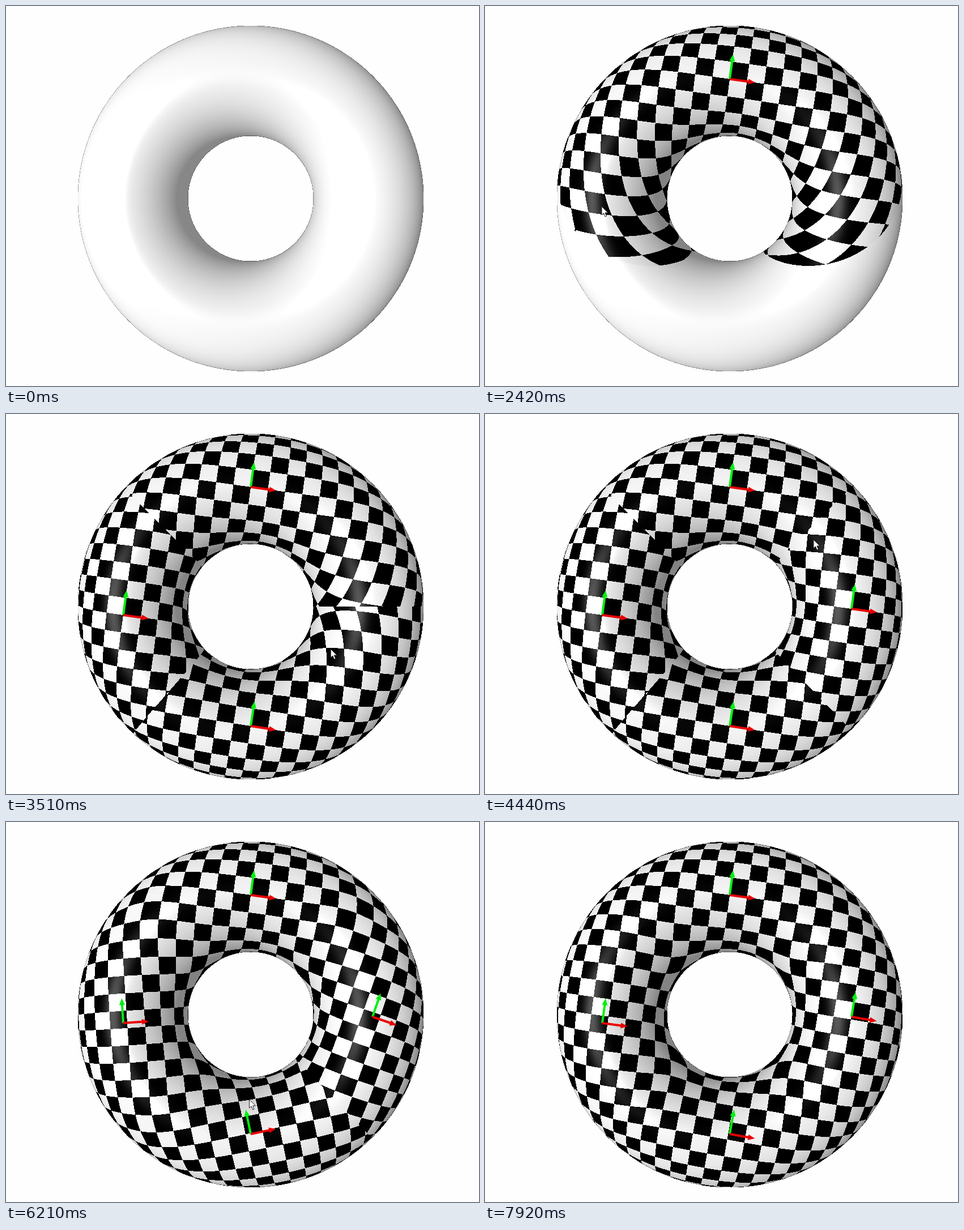
Recreate the animation shown at these times as an HTML page with a canvas. Size 835 px wide and 671 px high, loop 7.99 s.

```html
<!DOCTYPE html>
<html lang="en">
<head>
<meta charset="utf-8">
<title>Checker decals on a torus</title>
<style>
  html, body { margin: 0; width: 100%; height: 100%; overflow: hidden; background: #fefefe; }
  canvas { display: block; }
</style>
</head>
<body>
<canvas id="stage" width="835" height="671"></canvas>
<script>
const W = 835, H = 671, CX = 432, CY = 340, LOOP = 7990;
const EYE = 900, R = 205.7, r = 94.5;          // camera distance, torus radii
const CELL = 27.5, REACH = 352, BLEND = 30;    // checker size, decal radius, seam softness
const TAU = 2 * Math.PI;

// Decal centres on screen: top, left, bottom, right.
const seeds = [[432, 129], [207, 355], [432, 551], [647, 344]].map(([x, y]) => ({ x, y, ...locate(x, y) }));
const LINKS = [[0, 3], [0, 1], [1, 2], [2, 3]];

// Start time, frame angle of each placed decal, number of blended links.
const STATES = [
  [0, [], 0],
  [1500, [7.8], 0],
  [2650, [7.8, 7.8], 0],
  [3200, [7.8, 7.8, 8.8], 0],
  [3950, [7.8, 7.8, 8.8, 7.8], 0],
  [4600, [7.8, 7.8, 8.8, 19], 1],
  [5480, [7.8, -3.7, 8.8, 19], 2],
  [5920, [7.8, -3.7, -11.6, 19], 3],
  [6750, [7.8, 7.8, 10, 9.5], 4]
];
const POINTER = [
  [70, 763, 671], [810, 431, 129], [1650, 431, 129], [2400, 206, 354], [2660, 206, 354],
  [3040, 432, 551], [3220, 432, 551], [3700, 647, 344], [3960, 647, 344], [4400, 580, 222],
  [4620, 580, 222], [5280, 290, 217], [5490, 290, 217], [5780, 290, 490], [5930, 290, 490],
  [6500, 575, 490], [7000, 575, 490]
];
const CLICKS = [[1250, 1500], [2480, 2650], [3070, 3200], [3800, 3950], [4450, 4600],
  [5350, 5480], [5800, 5920], [6600, 6750]];

// Screen point to torus angles; null where the ray misses.
function locate(x, y) {
  const dx = x - CX, dy = y - CY, d = Math.hypot(dx, dy);
  const a = d * d + EYE * EYE, b = R * d + EYE * EYE, c = R * R + EYE * EYE - r * r;
  const disc = b * b - a * c;
  if (disc < 0) return null;
  const k = (b - Math.sqrt(disc)) / a, rho = d * k, z = EYE * (1 - k);
  let phi = Math.atan2(z, rho - R);
  if (phi < -1) phi += TAU;
  return { theta: Math.atan2(dy, dx), phi, rho, z };
}

// Exponential map of one seed, stored on a (theta, phi) grid.
const NT = 630, NP = 120, PHI0 = 0.2, PHI1 = 3.4;
const gridX = theta => (theta + Math.PI) / TAU * (NT - 1);
const gridY = phi => (phi - PHI0) / (PHI1 - PHI0) * (NP - 1);

function geodesic(seed, alpha) {
  const h = 2, pts = [];
  let phi = seed.phi, speed = Math.sin(alpha) / r, theta = 0;
  const c = (R + r * Math.cos(phi)) * Math.cos(alpha);
  const dirX = -Math.sin(seed.theta + alpha), dirY = Math.cos(seed.theta + alpha);
  const accel = p => -Math.sin(p) * c * c / (r * (R + r * Math.cos(p)) ** 3);
  for (let i = 0; i <= 240; i++) {
    if (i % 4 === 0) pts.push([gridX(theta), gridY(phi), dirX * i * h, dirY * i * h]);
    speed += accel(phi) * h / 2;
    const next = phi + speed * h;
    theta += h * c / (R + r * Math.cos((phi + next) / 2)) ** 2;
    phi = next;
    speed += accel(phi) * h / 2;
  }
  return pts;
}

function fillTriangle(map, a, b, c) {
  const bx = b[0] - a[0], by = b[1] - a[1], cx = c[0] - a[0], cy = c[1] - a[1];
  const det = bx * cy - cx * by;
  if (!det) return;
  const x0 = Math.max(0, Math.ceil(Math.min(a[0], b[0], c[0])));
  const x1 = Math.min(NT - 1, Math.floor(Math.max(a[0], b[0], c[0])));
  const y0 = Math.max(0, Math.ceil(Math.min(a[1], b[1], c[1])));
  const y1 = Math.min(NP - 1, Math.floor(Math.max(a[1], b[1], c[1])));
  for (let y = y0; y <= y1; y++) for (let x = x0; x <= x1; x++) {
    const px = x - a[0], py = y - a[1];
    const p = (px * cy - cx * py) / det, q = (bx * py - px * by) / det;
    if (p < -1e-6 || q < -1e-6 || p + q > 1.000001) continue;
    const u = a[2] + p * (b[2] - a[2]) + q * (c[2] - a[2]);
    const v = a[3] + p * (b[3] - a[3]) + q * (c[3] - a[3]);
    const i = y * NT + x;
    if (Math.hypot(u, v) < Math.hypot(map.u[i], map.v[i])) { map.u[i] = u; map.v[i] = v; }
  }
}

function buildMap(seed) {
  const RAYS = 720;
  const map = { u: new Float32Array(NT * NP).fill(1e7), v: new Float32Array(NT * NP).fill(1e7) };
  let prev = geodesic(seed, 0);
  for (let i = 1; i <= RAYS; i++) {
    const ray = geodesic(seed, i * TAU / RAYS);
    for (let j = 1; j < ray.length; j++) {
      fillTriangle(map, prev[j - 1], prev[j], ray[j]);
      fillTriangle(map, prev[j - 1], ray[j], ray[j - 1]);
    }
    prev = ray;
  }
  return map;
}

function sample(seed, theta, phi) {
  let t = theta - seed.theta;
  t -= TAU * Math.round(t / TAU);
  const x = gridX(t), y = gridY(phi);
  const ix = Math.min(NT - 2, Math.floor(x)), iy = Math.min(NP - 2, Math.floor(y));
  const fx = x - ix, fy = y - iy, i = iy * NT + ix;
  const mix = m => (m[i] * (1 - fx) + m[i + 1] * fx) * (1 - fy)
    + (m[i + NT] * (1 - fx) + m[i + NT + 1] * fx) * fy;
  return [mix(seed.map.u), mix(seed.map.v)];
}

function shade({ theta, phi, rho, z }) {
  const ct = Math.cos(theta), st = Math.sin(theta), cp = Math.cos(phi);
  const n = [cp * ct, cp * st, Math.sin(phi)], light = [-0.5, 0, 0.866];
  const dot = (a, b) => a[0] * b[0] + a[1] * b[1] + a[2] * b[2];
  const unit = a => { const m = Math.hypot(...a); return a.map(q => q / m); };
  const view = unit([-rho * ct, -rho * st, EYE - z]);
  const half = unit(view.map((q, i) => q + light[i]));
  const rim = dot(n, view) < 0.12 ? 0.7 : 1;
  return {
    lum: (0.53 + 0.5 * Math.max(0, dot(n, light))) * rim,
    spec: 0.35 * Math.max(0, dot(n, half)) ** 80
  };
}

for (const s of seeds) s.map = buildMap(s);

const pixels = [];
for (let y = 0; y < H; y++) for (let x = 0; x < W; x++) {
  const p = locate(x + 0.5, y + 0.5);
  if (!p) continue;
  const uv = seeds.map(s => sample(s, p.theta, p.phi));
  pixels.push({ at: (y * W + x) * 4, uv, dist: uv.map(q => Math.hypot(q[0], q[1])), ...shade(p) });
}

const toFrame = ([x, y], f) => [x * f.c + y * f.s, x * f.s - y * f.c];

// Texture origin of each decal so that linked decals line up.
function solveOffsets(frames, links) {
  const off = seeds.map(() => [0, 0]);
  const step = (i, j) => {
    const a = toFrame(sample(seeds[i], seeds[j].theta, seeds[j].phi), frames[i]);
    const b = toFrame(sample(seeds[j], seeds[i].theta, seeds[i].phi), frames[j]);
    return [0, 1].map(k => off[i][k] + (a[k] - b[k]) / 2);
  };
  links.slice(0, 3).forEach(([i, j]) => { off[j] = step(i, j); });
  if (links.length === 4) {
    const end = step(2, 3);
    for (const k of [0, 1]) {
      const gap = end[k] - off[3][k];
      off[1][k] -= gap / 4;
      off[2][k] -= gap / 2;
      off[3][k] += gap / 4;
    }
  }
  return off;
}

function renderState([, angles, linkCount]) {
  const canvas = document.createElement('canvas');
  canvas.width = W;
  canvas.height = H;
  const g = canvas.getContext('2d'), img = g.createImageData(W, H), data = img.data.fill(254);
  for (let i = 3; i < data.length; i += 4) data[i] = 255;
  const frames = angles.map(a => ({ c: Math.cos(a * Math.PI / 180), s: Math.sin(a * Math.PI / 180) }));
  const links = LINKS.slice(0, linkCount), off = solveOffsets(frames, links);
  const group = seeds.map((_, n) => frames.map((_, i) => i)
    .filter(i => i === n || links.some(l => l.includes(i) && l.includes(n))));

  for (const p of pixels) {
    let near = -1, best = REACH;
    for (let i = 0; i < frames.length; i++) if (p.dist[i] < best) { best = p.dist[i]; near = i; }
    let tint = 1;
    if (near >= 0) {
      let u = 0, v = 0, sum = 0;
      for (const i of group[near]) {
        const w = Math.exp((best - p.dist[i]) / BLEND);
        if (w < 1e-4) continue;
        const f = frames[i], [x, y] = p.uv[i];
        u += w * (x * f.c + y * f.s + off[i][0]);
        v += w * (x * f.s - y * f.c + off[i][1]);
        sum += w;
      }
      const parity = Math.floor(u / sum / CELL) + Math.floor(v / sum / CELL);
      tint = parity & 1 ? 0.97 : 0;
    }
    data[p.at] = data[p.at + 1] = data[p.at + 2] = 255 * Math.min(1, p.lum * tint + p.spec);
  }
  g.putImageData(img, 0, 0);
  return canvas;
}

const pictures = STATES.map(renderState);
const ctx = document.getElementById('stage').getContext('2d');

function polygon(points, fill) {
  ctx.beginPath();
  points.forEach(p => ctx.lineTo(...p));
  ctx.closePath();
  ctx.fillStyle = fill;
  ctx.fill();
}

function arrow(seed, degrees, length, color) {
  ctx.save();
  ctx.translate(seed.x, seed.y);
  ctx.rotate(degrees * Math.PI / 180);
  polygon([[0, -2], [length - 12, -2], [length - 12, -5], [length, 0],
    [length - 12, 5], [length - 12, 2], [0, 2]], color);
  ctx.restore();
}

function drawPointer(t) {
  const i = POINTER.findIndex(k => k[0] > t);
  if (i < 1) return;
  const [t0, x0, y0] = POINTER[i - 1], [t1, x1, y1] = POINTER[i];
  const q = (t - t0) / (t1 - t0), e = q * q * (3 - 2 * q);
  ctx.save();
  ctx.translate(x0 + (x1 - x0) * e, y0 + (y1 - y0) * e);
  if (CLICKS.some(([a, b]) => t >= a && t < b)) {
    ctx.beginPath();
    ctx.arc(0, 0, 14, 0, TAU);
    ctx.fillStyle = 'rgba(253, 246, 80, 0.78)';
    ctx.fill();
  }
  polygon([[0, 0], [0, 15], [3.5, 12], [6, 18], [8.5, 17], [6, 11], [11, 11]], '#fff');
  ctx.strokeStyle = '#222';
  ctx.lineWidth = 1;
  ctx.stroke();
  ctx.restore();
}

function draw(t) {
  let k = STATES.length - 1;
  while (STATES[k][0] > t) k--;
  ctx.drawImage(pictures[k], 0, 0);
  STATES[k][1].forEach((angle, i) => {
    arrow(seeds[i], angle - 90, 44, '#00f010');
    arrow(seeds[i], angle, 45, '#e80000');
  });
  drawPointer(t);
}

const start = performance.now();
function tick() {
  draw((performance.now() - start) % LOOP);
  requestAnimationFrame(tick);
}
tick();
</script>
</body>
</html>
```
